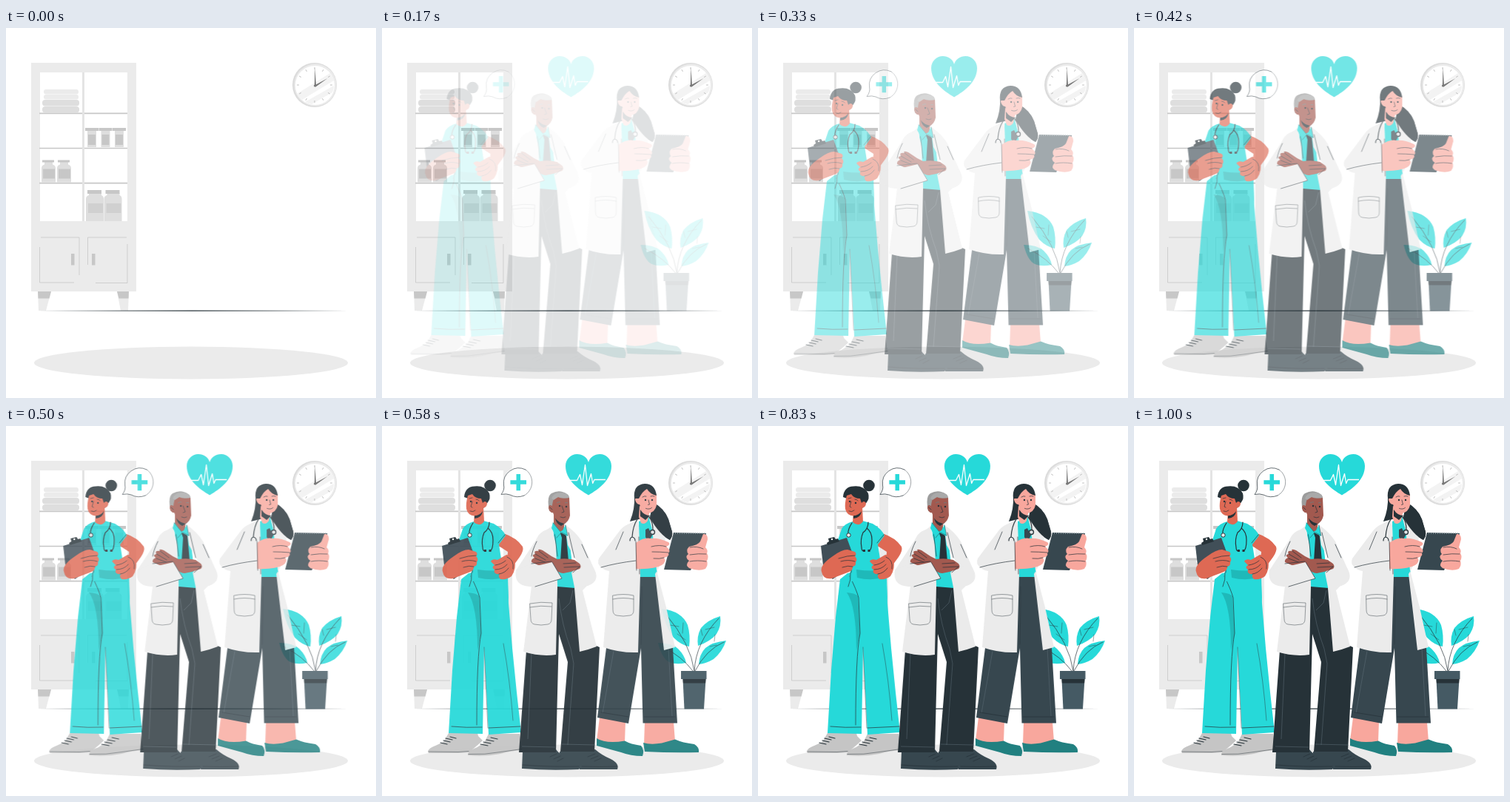
These frames come from a looping animation (500 px wide and 500 px high, 1.04 s). An HTML page:

```html
<!DOCTYPE html>
<html lang="en">
<head>
<meta charset="utf-8">
<title>Medical team</title>
<style>
html, body { margin: 0; width: 100%; height: 100%; overflow: hidden; background: #fff; }
svg { display: block; width: 100%; height: 100%; }
.in { animation: enter 1s cubic-bezier(.36, -.01, .5, 1.38) both paused; }
@keyframes enter {
  from { opacity: 0; transform: translateX(-30px); }
  to { opacity: 1; transform: none; }
}
.l { fill: none; stroke: #263238; stroke-width: .7; stroke-linecap: round; stroke-linejoin: round; }
.thin { stroke-width: .45; }
.bold { stroke-width: 1.2; }
.s { fill: none; stroke: #61717a; stroke-width: .5; }
.t { fill: #26d9d9; }
.d { fill: #263238; }
.g { fill: #37474f; }
.c { fill: #ebebeb; }
.m { fill: #c7c7c7; }
.e { fill: #dedede; }
.w { fill: #fff; }
.p { fill: #455a64; }
.k1 { fill: #de6954; }
.k2 { fill: #a2594f; }
.k3 { fill: #f8a79d; }
.z { fill: #1fb9b9; }
.q { fill: #218080; }
</style>
</head>
<body>
<svg viewBox="0 0 500 500">
<defs>
  <g id="small"><path class="e" d="M3 4h12v22H3z"/><path class="m" d="M0 0h18v4H0zM4 9h10v14H4z"/></g>
  <g id="round"><path class="e" d="M4 2h11v4q4 1 4 5v19H0V11q0-4 4-5z"/><path class="m" d="M1 0h16v3H1zM2 12h16v13H2z"/></g>
  <g id="big"><path class="e" d="M4 4h17v3q3 1 3 5v30H0V12q0-4 4-5z"/><path class="m" d="M2 0h19v5H2z"/><path fill="#d0d0d0" d="M3 18h20v13H3z"/></g>
  <path id="tick" d="M417 53v3"/>
</defs>

<g id="cabinet">
  <path class="c" d="M34 47h142v309H34z"/>
  <path class="w" d="M46 60h118v201H46z"/>
  <path fill="#e4e4e4" d="M103 60h3v201h-3z"/>
  <path class="m" d="M45 114.600h58v1.600H45zM106 114.600h58v1.600h-58zM45 161.700h58v1.600H45zM106 161.700h58v1.600h-58zM45 208.800h58v1.600H45zM106 208.800h58v1.600h-58z"/>
  <g class="c"><rect x="51" y="83" width="47" height="6.500" rx="3"/><rect x="51" y="90" width="47" height="6.500" rx="3"/></g>
  <g class="e"><rect x="49" y="97" width="50" height="8.500" rx="4"/><rect x="49" y="106" width="50" height="8.500" rx="4"/></g>
  <use href="#small" x="107" y="135"/><use href="#small" x="125.500" y="135"/><use href="#small" x="144" y="135"/>
  <use href="#round" x="48" y="178.500"/><use href="#round" x="69" y="178.500"/>
  <use href="#big" x="108" y="219"/><use href="#big" x="132.500" y="219"/>
  <path fill="none" stroke="#c2c2c2" stroke-width=".7" d="M47 283H99V334M45.500 296V344H92M110.500 320V283H163M164 292V344.500H121"/>
  <path class="m" d="M88 305h4.500v15.500H88zM116 305h4.500v15.500H116z"/>
  <path class="c" d="M43 356h18l-7 26H44zM150 356h16l-1 26h-10z"/>
  <path class="m" d="M43 356h18l-2.500 9.500h-15zM150 356h16l-.4 9.500h-13.100z"/>
</g>

<g id="clock">
  <circle cx="417" cy="77" r="30" fill="#dcdcdc"/>
  <circle cx="418" cy="77" r="28.500" class="c"/>
  <circle cx="417.500" cy="77.500" r="26.500" class="w"/>
  <path fill="#f3f3f3" d="M393 89l45-28q4 5 5 10l-43 26q-5-4-7-8zM404 100l39-22q0 5-2 9l-28 16q-5-1-9-3z"/>
  <g stroke="#b5b5b5" stroke-width=".8" id="ticks"></g>
  <path d="M416.800 79l.7-26 1.500 25zM416 78l18.500-10-16 11.500z" fill="#777"/>
  <circle cx="417.500" cy="78" r="1.500" fill="#777"/>
</g>

<path class="d" d="M42 382Q250 381 465 382 250 383.300 42 382z"/>
<ellipse cx="250" cy="452.500" rx="212" ry="22" class="c"/>

<g class="in" id="plant">
  <path class="t" d="M380 247Q407 250 415 269 419 283 417 298 406 296 396 286 384 270 380 247zM459 257Q461 270 454 281 446 291 429 297 427 284 433 273 442 262 459 257zM467 290Q462 305 450 315 440 321 430 322 431 308 439 300 448 292 467 290zM375 293Q393 293 402 301 411 310 413 320 399 323 390 319 380 314 375 293z"/>
  <path class="l" d="M424 331Q419 294 386 255M424 331Q426 292 457 260M425 331Q440 302 464 292M422 331Q408 312 381 298"/>
  <path class="l thin" d="M412 289l-11-8m7-1l1-14m-6 5l-12-2m44 14l-2-8m6 0l12-3m-6 26l9-2m-3-5l1-9"/>
  <path class="p" d="M408.500 342h31l-2.500 40.500h-26.500z"/>
  <path class="d" d="M408.500 342h31l-.4 5.500h-30.200z"/>
  <path class="p" d="M406 331h34.500v11H406z"/>
</g>

<g class="in" id="heart">
  <path class="t" d="M281 93.500C267 85 250 73 250 54 250 45 257 38 265.500 38 273 38 279 42 281 49 283 42 289 38 296.500 38 305 38 312 45 312 54 312 73 295 85 281 93.500z"/>
  <path fill="none" stroke="#fff" stroke-width="1.300" stroke-linejoin="round" d="M252 73.500h13.500l4-8 3 14 4-27 3 28 5-16 2.200 13 2.300-5H304"/>
</g>

<g class="in" id="bubble">
  <path class="w" d="M163 92.500Q168 86 166.500 80A20.500 20.500 0 1 1 175 93Q170 91 163 92.500z"/>
  <path class="l" d="M196 59A20.500 20.500 0 0 0 166.500 80Q168 86 163 92.500 170 91 175 93 184 98 194 94"/>
  <path class="l thin" d="M194 94A20.500 20.500 0 0 0 196 59"/>
  <path class="t" d="M183.500 65h5.500v8.300h8v5.500h-8v8.400h-5.500v-8.400h-8.100v-5.500h8.100z"/>
</g>

<g class="in" id="doctor">
  <path class="k3" d="M296 394l35 5-1 28-16 8-22-10zM357 400h39l2 26-22 7-20-3z"/>
  <path class="q" d="M292 422Q305 430 330 425.500 338 430 352 432 357 438 354 446 338 446 325 441L292 432zM355 428Q365 431 380 428.500L398 423.500Q408 428 424 430 431 434 430 441 395 442 357 440z"/>
  <path class="g" d="M348 203h24l23 97 6 101.500H354.500L352 300 335 402l-42-8 12-94z"/>
  <path class="s" d="M315 304l-15 84M389 300l5 92"/>
  <path class="l" d="M298 387l37 6M356 393h42"/>
  <path class="l thin" d="M353 217q0 40-1 78"/>
  <path class="t" d="M349 129l14-6 8 14 3 67h-24z"/>
  <path class="d" d="M343 94Q344 112 337 129L353 125 354 100zM368 103Q384 112 389 126L394 143Q395 149 391 154 377 147 364 124z"/>
  <path class="c" d="M347 126Q340 131 334 133 327 136 322 143L295 179Q292 186 298 191 302 195 309 196L301 299Q324 307 348 306L351 200 349 135zM362 121Q380 132 385 150L382 181 371 200 383 303 398 299 386 245 373 195 367 140z"/>
  <path class="d" d="M368 103Q384 112 389 126L394 143Q395 149 391 154 377 147 364 124z"/>
  <path class="l" d="M349 150l1 50M328 143l-10 24m-20 24q21-6 47-9"/>
  <path class="l thin" d="M314 229q14-3 28 0v20q0 6-5 7-9 2-18 0-5-1-5-7zM314 234q14-3 28 0"/>
  <path class="k3" d="M350 108l14 6-3 14q-4 6-9 3l-3-8z"/>
  <path class="d" d="M351 113q5 8 13 8l-6 6-7-5z"/>
  <path class="k3" d="M352 87Q351 94 348 96 344 95 344 100 346 106 350 106 353 116 361 118 371 117 373 107L373 92Q364 92 360 84 356 83 352 87z"/>
  <path class="d" d="M343 98Q341 79 357 78 371 78 373 94 364 92 360 85 354 88 349 98z"/>
  <g class="d"><circle cx="358" cy="100" r="1.200"/><circle cx="367" cy="100" r="1.200"/></g>
  <path class="l" d="M354 96q3-2 5-1m6 0q3-1 5 0m-8 5l1.500 6-2 .4m-3 5q5 2 8-1"/>
  <path class="l bold" d="M347 126q-6 9-7 24m23-27q5 6 5 17m-28 10q-3 1-3 5m3-5q4 1 4 5"/>
  <circle cx="367.500" cy="143.500" r="3" fill="#dfe5e7" stroke="#263238" stroke-width="1.300"/>
  <path class="g" d="M396 144l44 1q0 4-3 9l-18 41-36-1z"/>
  <path fill="none" stroke="#90a0a6" stroke-width="1.500" stroke-dasharray="1 2" d="M398 145h40"/>
  <path class="g" d="M358 140l4-2 5 10-3 5q-4 1-6-3z"/>
  <path class="k3" d="M345 158Q356 150 365 152 376 151 389 157 393 160 386 163 393 168 389 172 391 176 383 178 387 183 380 188 370 194 345 193zM436 146Q442 145 442 153L439 164Q443 168 441 172 444 177 441 182 443 188 439 193 430 197 417 192 411 188 417 182 410 177 416 173 412 168 417 163 429 161 432 156z"/>
  <path class="l" d="M366 163q11-3 20 0m-19 7q10 0 22 1m-20 8q8 1 14-1M418 164q10-2 18 2m-18 8q12-2 22-1m-22 10q10-2 22 0M345 156l1 39"/>
</g>

<g class="in" id="nurse">
  <path fill="#c5c5c5" d="M64 440Q65 435 74 432L85 427 92 415h39l1 4 6 6Q132 431 119 441L105 442H65zM118 443Q120 438 129 435L140 428 146 416h42l3 22Q175 439 162 443 142 447 118 445z"/>
  <path class="l bold" d="M81 428l9 2m-5-5l9 2m-6-5l9 2m-3-4l8 2M135 430l10 2m-6-5l10 2m-6-5l10 2m-4-5l9 2"/>
  <path class="l thin" d="M65 440l40 .5 14-1m0 4q22 1 43-3l29-4"/>
  <path class="t" d="M119 199L109 207 103 258 97 330 92 415 138 416 140 299 146 417 190 414 184 360 178 300 173 240 171 190z"/>
  <path class="z" d="M118 225q12 1 15 5l3 50-5 23q0-60-13-78z"/>
  <path class="l" d="M122 203q9 18 12 29l2 48q-6 30-6 124M96 406q20 2 41 1M146 408l43-2"/>
  <path class="l thin" d="M140 299l5 109M166 294q9 50 13 104"/>
  <path class="k1" d="M166 145Q184 151 192 163 194 168 188 177L180 188 171 182 172 170 158 161zM108 157l14 7-11 10-13 6q3-14 10-23z"/>
  <path class="t" d="M126 129Q115 132 111 139L105 157 122 166 123 197Q122 207 119 215L132 205 168 206 173 239 172 202 165 192 160 160 169 148Q165 139 153 132L139 128z"/>
  <path class="z" d="M131 194q22 3 38 0l3 10q-20 6-40 1z"/>
  <path class="l" d="M123 198q1 10-3 19m39-59l9-11M121 170q5 14 3 28"/>
  <path class="k1" d="M127 116l12-6 1 19q-6 8-14 1z"/>
  <path class="d" d="M127 121q7 0 11-6-1 9-11 10z"/>
  <circle cx="148" cy="80.500" r="7.800" class="d"/>
  <path class="d" d="M113 96Q114 82 127 81.500 141 80 147 91 149 98 145 103L139 111 126 101z"/>
  <path class="k1" d="M118 94Q115 104 116 112 118 121 127 121.500 135 120 138 111 144 110 144 104 141 100 138 104L136 98Q128 98 124 92z"/>
  <g class="d"><circle cx="122" cy="102" r="1.200"/><circle cx="130" cy="104" r="1.200"/></g>
  <path class="l" d="M120 98l4-1m5 2q3 0 4 2m-9 1l-2 7 2 1m-3 5q4 2 7-1"/>
  <path class="l bold" d="M147 130q0 9-7 14-4 9-2 20 0 5 3 5M145 138q7 5 7 16 0 13-4 15M125 131q-6 9-5 15"/>
  <circle cx="120.500" cy="147.500" r="2.700" fill="#eceff0" stroke="#263238"/>
  <path class="d" d="M140 167h3v3h-3zM146.500 167h3v3h-3z"/>
  <path fill="#414f58" d="M83 162l35-11 12 33-31 23-12-10z"/>
  <path class="d" d="M91 158l3-2-1-4 8-2 2 3 3-1 2 4-16 5z"/>
  <circle cx="98" cy="153" r="1.200" class="w"/>
  <path class="k1" d="M84 197Q81 188 99 176 111 167 119 167L129 170Q132 173 129 176 133 180 130 184 131 189 126 190 127 195 119 198L98 206Q86 208 84 197zM149 183Q151 179 158 181L170 174Q178 174 181 182 184 192 177 203 171 208 162 207 158 203 161 200 152 201 154 194 149 191 154 188z"/>
  <path class="l" d="M107 179q12-4 22-4m-19 8q10-3 19 0m-17 8q8-3 14-1M155 188q8-1 14-6m-14 12q10 0 16-7m-11 13q8-1 13-8M171 177q10 4 8 16"/>
</g>

<g class="in" id="senior">
  <path class="g" d="M191 463L192 440 237 437Q242 444 253 449 270 455 268 464 228 466 192 463zM242 440L290 437Q299 445 311 450 323 456 320 464L269 464Q264 453 242 446z"/>
  <path class="l" d="M192 458q37 3 76 2m4 0q25 1 48 0M229 447l9-4m-4 7l9-4m-4 7l8-4M280 447l10-4m-6 7l10-4m-5 7l9-4"/>
  <path class="d" d="M239 216h24l20 77 13 6-7 141h-46l10-121-12-38-4 160h-50l10-138z"/>
  <path class="s" d="M204 307l-5 116M260 222l-4 17-10 10m-5-16q4 36 16 68l4 20-8 110M191 433l45 1m9-4l45 1"/>
  <path class="t" d="M233 135l15 1 7 17 8 66-24-2z"/>
  <path class="d" d="M243 145l5-1 3 5 3 34h-11l2-32z"/>
  <path class="c" d="M231 135Q228 139 220 142 214 145 210 154L183 195 200 214 204 216 193 305Q216 312 237 309L239 217 237 160zM249 133Q264 143 272 156L289 194 278 217 273 222 292 298Q282 302 269 305L262 219 268 188 253 161z"/>
  <path class="c" d="M183 195Q198 186 214 184L232 183 245 206 209 217Q179 219 183 195zM258 198L269 188 288 192Q294 202 290 209 283 219 262 218z"/>
  <path class="k2" d="M204 184Q203 180 208 178 203 174 209 173 206 168 214 169 211 165 219 168L231 176 239 180Q251 178 262 181L269 186Q272 190 269 193 259 197 247 199 240 199 234 191L213 188z"/>
  <path class="c" d="M190 194l42-10 13 22-36 11-24-8z"/>
  <path class="l" d="M232 184l13 22-36 11M211 156q-6 12-7 20m0 10l27-3M209 179l13 5m-13-11l14 8m-9-12l12 9M248 191l21-1m-22-4l17-1M272 160l8 18m-20 20l9-8"/>
  <path class="l" d="M235 142l4 34M254 144l8 34"/>
  <path class="l thin" d="M202 240q15-3 30-1l-1 22q0 6-5 7-9 2-18 0-5-1-5-7zM202 245q15-3 29-1"/>
  <path class="k2" d="M234 119l15 7-1 10q-2 9-8 5l-6-8z"/>
  <path class="d" d="M236 124q6 7 14 7l-6 4q-7-3-8-11z"/>
  <path class="t" d="M233 130l11 14-6 7-7-13zM250 133l3 16-8-4z"/>
  <path class="l thin" d="M233 131l11 13-6 7M250 134l3 14-8-4"/>
  <path fill="#9c9c9c" d="M228 115Q224 95 231 91 242 85 252 92 257 95 254 105L234 115z"/>
  <path class="k2" d="M234 98Q232 105 232 108 227 105 227 111 229 118 233 117 236 130 248 132 254 130 256 121L255 97Q244 99 240 96z"/>
  <path fill="#a9a9a9" d="M231 98q3-9 15-8 8 1 9 7-8 1-15-1l-6 4z"/>
  <g class="d"><circle cx="242" cy="108" r="1.200"/><circle cx="251" cy="109" r="1.200"/></g>
  <path class="l" d="M245 108l3 8-3 1m-2 6q4 2 7 0M229 110l3 3"/>
  <path fill="none" stroke="#777" d="M238 104q3-2 5-1m6 1q2-1 4 0"/>
</g>
</svg>
<script>
const ticks = document.getElementById('ticks');
for (let i = 0; i < 12; i++) {
  const tick = document.createElementNS('http://www.w3.org/2000/svg', 'use');
  tick.setAttribute('href', '#tick');
  tick.setAttribute('transform', `rotate(${i * 30} 417 77)`);
  ticks.append(tick);
}

// The motion advances at 24 steps a second, then holds briefly before looping.
const LOOP = 1040, STEP = 1000 / 24, LEAD = 36;
const entries = document.getAnimations();
const start = performance.now();
function draw() {
  const time = (performance.now() - start) % LOOP;
  const step = Math.floor((time + 5.1) / STEP);
  const at = step < 2 ? 0 : Math.min(1000, step * STEP + LEAD);
  for (const entry of entries) entry.currentTime = at;
  requestAnimationFrame(draw);
}
draw();
</script>
</body>
</html>
```
